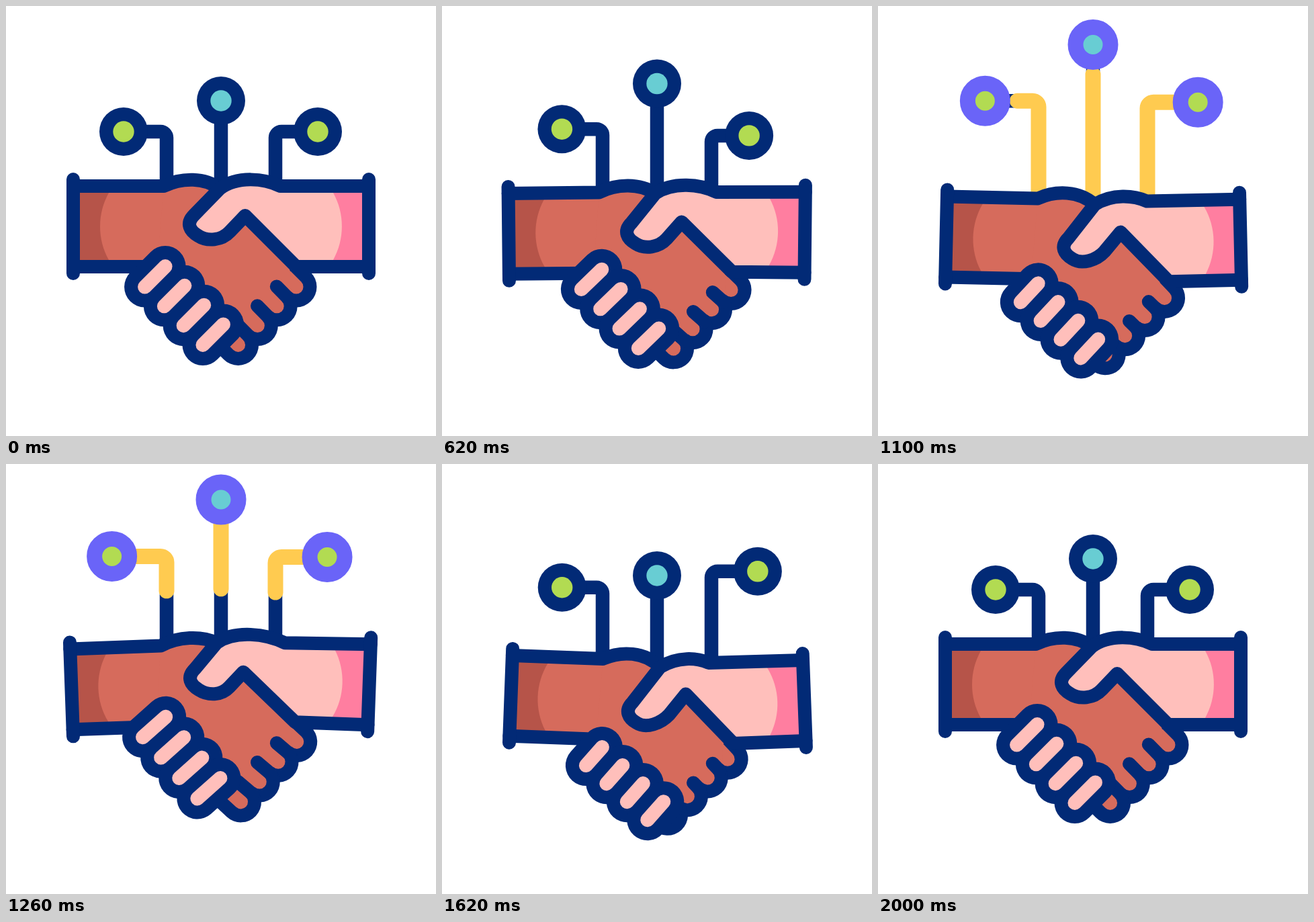
These frames come from a looping animation (640x640 px, 2200 ms). An HTML page with a canvas:

```html
<!DOCTYPE html>
<html lang="en">
<head>
<meta charset="utf-8">
<title>Handshake</title>
<style>
  html, body { margin: 0; height: 100%; overflow: hidden; background: #fff; }
  canvas { display: block; width: 100vw; height: 100vh; }
</style>
</head>
<body>
<canvas id="stage" width="640" height="640"></canvas>
<script>
const ctx = document.getElementById('stage').getContext('2d');
const LOOP = 2200;
const NAVY = '#022a76', BROWN = '#d66b5c', DARK = '#b65449', PINK = '#ffbfbb', ROSE = '#ff7ea0';
const GREEN = '#b2db52', TEAL = '#68cdd3', YELLOW = '#ffcb50', PURPLE = '#6a64f8';

// ---- timing ----
const clamp = x => Math.min(1, Math.max(0, x));
const ramp = (t, from, to) => clamp((t - from) / (to - from));
const sine = x => (1 - Math.cos(Math.PI * x)) / 2;
const mix = (a, b, k) => a + (b - a) * k;

// cubic-bezier(.15, 0, .18, 1), solved by bisection
function glide(x) {
  let lo = 0, hi = 1;
  for (let i = 0; i < 24; i++) {
    const u = (lo + hi) / 2, v = 1 - u;
    if (3 * v * v * u * .15 + 3 * v * u * u * .18 + u * u * u < x) lo = u; else hi = u;
  }
  return lo * lo * (3 - 2 * lo);
}

// keys: [time, values, easing towards this key]
function tween(keys, t) {
  if (t <= keys[0][0]) return keys[0][1];
  for (let i = 1; i < keys.length; i++) {
    const [t0, from] = keys[i - 1], [t1, to, ease = sine] = keys[i];
    if (t < t1) return from.map((v, j) => mix(v, to[j], ease(ramp(t, t0, t1))));
  }
  return keys[keys.length - 1][1];
}

// shake state: lean (degrees) and sink (0 at rest, 1 while shaking)
const SWING = 2.25;
const shakeKeys = [
  [200, [0, 0]], [463, [SWING, 1]], [733, [-SWING, 1]], [1015, [SWING, 1]],
  [1298, [-SWING, 1]], [1580, [SWING, 1]], [1862, [0, 0]]
];
let lean = 0, sink = 0;

// A part shifts by sink and lean, and turns by lean about its pivot.
const part = (px, py, [sx, sy], [lx, ly], turn) => (x, y) => {
  const a = lean * turn * Math.PI / 180, c = Math.cos(a), s = Math.sin(a);
  return [
    px + (x - px) * c - (y - py) * s + sx * sink + lx * lean,
    py + (x - px) * s + (y - py) * c + sy * sink + ly * lean
  ];
};
const slide = (bySink, byLean) => part(0, 0, bySink, byLean, 0);
const left = part(100, 398, [0, 12.3], [0, 2.4], 1);
const right = part(540, 398, [0, 12.2], [.9, 5.8], -1);
const pinkHand = part(265, 446, [1.6, 10.3], [2.6, 9.3], -1.6);
const brownHand = part(389, 461, [-3, 8.3], [-2.6, 5.5], 1);
const knuckle = slide([0, 13], [0, 7.4]);
const tip = slide([2.5, 18.8], [.7, 12]);
const web = slide([2.2, 16.5], [1.4, 10]);
const vee = slide([2, 14.2], [2.3, 8]);
const notch = slide([1, 12.2], [2.7, 8.7]);
const crown = slide([1, 14.5], [2.5, 9.5]);
const shoulder = slide([-2, 13.5], [-1.8, 8.7]);
const join = slide([-2, 13.2], [-4.4, 7.2]);

// ---- drawing ----
// Each segment holds one point (line) or three (curve).
function trace(...segs) {
  ctx.beginPath();
  segs.forEach((s, i) => {
    if (s.length === 3) ctx.bezierCurveTo(...s.flat());
    else if (i) ctx.lineTo(...s[0]);
    else ctx.moveTo(...s[0]);
  });
}
function fill(color, ...segs) {
  trace(...segs);
  ctx.fillStyle = color;
  ctx.fill();
}
function stroke(color, width, ...segs) {
  trace(...segs);
  ctx.strokeStyle = color;
  ctx.lineWidth = width;
  ctx.stroke();
}
function disc(x, y, r, color) {
  ctx.beginPath();
  ctx.arc(x, y, r, 0, 7);
  ctx.fillStyle = color;
  ctx.fill();
}

// ---- nodes ----
const nodes = [
  { x: 239, delay: 70, late: 10, color: GREEN, rest: [175, 187], low: [187, 202], high: [157, 136] },
  { x: 320, delay: 0, late: 0, color: TEAL, rest: [320, 141], low: [320, 168], high: [320, 52] },
  { x: 401, delay: 131, late: -10, color: GREEN, rest: [464, 187], low: [454, 201], high: [479, 136] }
];

function drawNode(n, t) {
  const [bx, by] = tween([
    [200, n.rest], [400, n.low], [1382, n.high, glide], [1643, n.low], [1843, n.rest]
  ], t - n.delay);
  const base = 285 + 12 * sink + 6 * lean;
  const straight = n.delay === 0;

  const stem = (color, width) => {
    ctx.beginPath();
    ctx.moveTo(n.x, base);
    if (!straight) ctx.arcTo(n.x, by, bx, by, 9);
    ctx.lineTo(bx, by);
    ctx.strokeStyle = color;
    ctx.lineWidth = width;
    ctx.stroke();
  };
  stem(NAVY, 20.5);

  const length = base - by + Math.abs(n.x - bx) - (straight ? 0 : 4);
  const end = sine(ramp(t - n.late, 683, 1262));
  const start = sine(ramp(t, 1005, 1570));
  if (end > start) {
    ctx.setLineDash([length * (end - start), 999]);
    ctx.lineDashOffset = -length * start;
    stem(YELLOW, 23);
    ctx.setLineDash([]);
  }

  disc(bx, by, 36, NAVY);
  disc(bx, by, 15.7, n.color);
  const wake = straight ? 680 : 759;
  ctx.globalAlpha = ramp(t, wake, wake + 110) * (1 - ramp(t, 1450, 1580));
  ctx.beginPath();
  ctx.arc(bx, by, 26, 0, 7);
  ctx.strokeStyle = PURPLE;
  ctx.lineWidth = 23;
  ctx.stroke();
  ctx.globalAlpha = 1;
}

// ---- hands ----
const STEP = 28.8;
const each = (count, draw) => { for (let i = 0; i < count; i++) draw(i * STEP); };

function drawBrownHand() {
  const bump = [left(262, 255), left(296, 255), notch(318, 272)];

  const finger = d => [[brownHand(432 - d, 418 + d)], [brownHand(417 - d, 403 + d)]];
  each(4, d => stroke(NAVY, 61, ...finger(d)));
  each(4, d => stroke(BROWN, 21, ...finger(d)));

  fill(DARK, [left(100, 268)], [left(200, 268)], [left(200, 388)], [left(100, 388)]);
  fill(BROWN,
    [left(157, 268)], [left(153, 278)],
    [left(135.7, 309), left(135.7, 347), left(153, 378)],
    [left(158, 388)], [left(225, 388)], [left(300, 380)],
    [notch(318, 272)], [left(277, 258)], [left(235, 268)]);
  fill(BROWN, [left(235, 268)], bump,
    [vee(356, 312)], [right(420, 376)], [brownHand(424, 404)], [brownHand(424, 426)],
    [brownHand(346, 505)], [pinkHand(300, 460)], [pinkHand(225, 385)]);

  each(3, d => stroke(NAVY, 20,
    [knuckle(402.8 - d, 417.5 + d)], [brownHand(421 - d, 436 + d)]));

  stroke(NAVY, 20, [left(100, 268)], [left(235, 268)], bump);
  stroke(NAVY, 20, [left(100, 388)], [left(216, 388)]);
  stroke(NAVY, 20, [left(100, 258)], [left(100, 398)]);
}

function drawPinkHand() {
  const outline = [
    [right(540, 268)], [join(408, 268)],
    [shoulder(385, 257), crown(345, 252), notch(318, 272)],
    [tip(280, 311)],
    [tip(267, 324), tip(274, 335), tip(286, 342)],
    [tip(300, 351), web(321, 349), web(333, 336)],
    [vee(356, 312)], [right(432, 388)], [right(540, 388)]
  ];
  fill(PINK, ...outline);
  fill(ROSE,
    [right(481, 268)], [right(487, 278)],
    [right(504.3, 309), right(504.3, 347), right(487, 378)],
    [right(481, 388)], [right(540, 388)], [right(540, 268)]);
  stroke(NAVY, 20, ...outline);
  stroke(NAVY, 20, [right(540, 258)], [right(540, 398)]);

  // fingers shorten as the grip sinks
  const reach = 15.25 * (1 - .05 * sink - .053 * lean);
  const finger = d => [
    [pinkHand(221.8 + d + reach, 402.8 + d - reach)],
    [pinkHand(221.8 + d - reach, 402.8 + d + reach)]
  ];
  each(4, d => stroke(NAVY, 61, ...finger(d)));
  each(4, d => stroke(PINK, 21, ...finger(d)));
}

function draw(now) {
  const t = now % LOOP;
  [lean, sink] = tween(shakeKeys, t);
  ctx.fillStyle = '#fff';
  ctx.fillRect(0, 0, 640, 640);
  ctx.lineCap = ctx.lineJoin = 'round';
  nodes.forEach(n => drawNode(n, t));
  drawBrownHand();
  drawPinkHand();
}

const begin = performance.now();
function loop() {
  draw(performance.now() - begin);
  requestAnimationFrame(loop);
}
loop();
</script>
</body>
</html>
```
